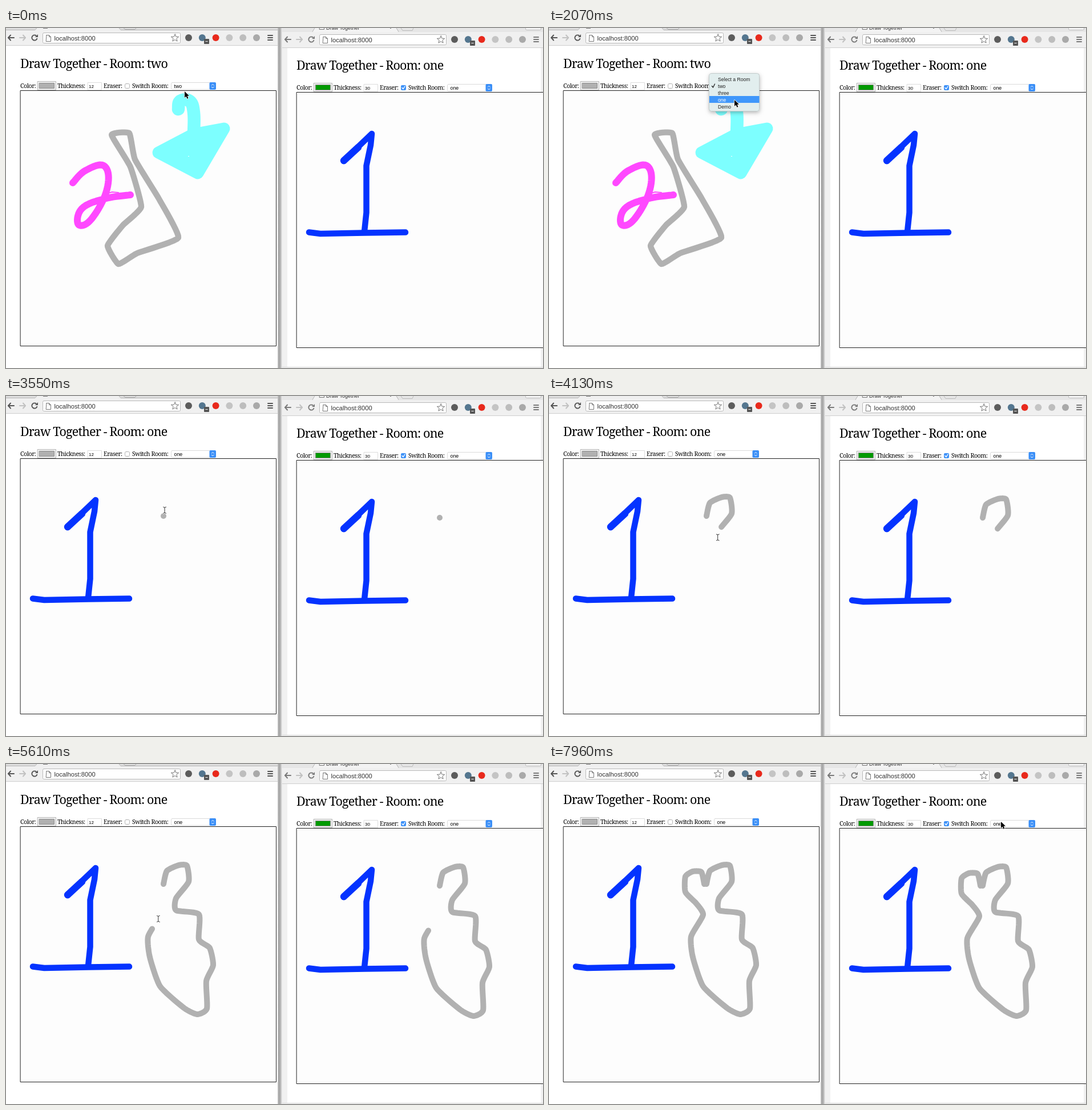
An HTML page with a canvas for the animation above (8 s loop, 941 px wide and 595 px high).

```html
<!DOCTYPE html>
<html lang="en">
<head>
<meta charset="utf-8">
<title>Draw Together</title>
<style>
  html, body { margin: 0; width: 100%; height: 100%; overflow: hidden; background: #fff; }
  canvas { display: block; }
</style>
</head>
<body>
<canvas id="stage" width="941" height="595"></canvas>
<script>
const ctx = document.getElementById('stage').getContext('2d');
const LOOP = 8000, STEP = 147.4;
const SERIF = '"Noto Serif", serif', SANS = '"Liberation Sans", sans-serif';
const GRAY = '#b1b1b1', BLUE = '#0433ff', CYAN = '#7dffff', PINK = '#ff48ff';
const ITEMS = ['Select a Room', 'two', 'three', 'one', 'Demo'];

// Steps at which the story moves on
const OPEN = 2, PICK = 17, JOIN = 18, PRESS = 24, RELEASE = 43, LEAVE = 45, END = 54;

const clamp = v => Math.min(1, Math.max(0, v));
const easeOut = p => 1 - (1 - p) ** 2;
const mix = (a, b, p) => a.map((v, i) => v + (b[i] - v) * p);

// Cardinal spline through a few key points, as a dense polyline.
function spline(keys, closed = false, tension = 0.3) {
  const n = keys.length, pts = [];
  const key = i => keys[closed ? (i + n) % n : Math.min(n - 1, Math.max(0, i))];
  for (let i = 0; i < (closed ? n : n - 1); i++) {
    const [a, b, c, d] = [key(i - 1), key(i), key(i + 1), key(i + 2)];
    for (let s = 0; s < 10; s++) {
      const t = s / 10, u = 1 - t;
      pts.push(b.map((v, j) =>
        v * (1 + 2 * t) * u * u + c[j] * t * t * (3 - 2 * t) +
        tension * (t * u * u * (c[j] - a[j]) - t * t * u * (d[j] - v))));
    }
  }
  if (!closed) pts.push(keys[n - 1]);
  return pts;
}

// The first part of a polyline, up to a fraction of its length.
function prefix(pts, part) {
  const gap = i => Math.hypot(pts[i][0] - pts[i - 1][0], pts[i][1] - pts[i - 1][1]);
  let left = part * pts.reduce((sum, _, i) => i ? sum + gap(i) : 0, 0);
  const out = [pts[0]];
  for (let i = 1; i < pts.length && left > 0; i++) {
    const d = gap(i);
    out.push(mix(pts[i - 1], pts[i], Math.min(1, left / d)));
    left -= d;
  }
  return out;
}

const SKETCH = spline([[276,210],[282,187],[303,177],[317,178],[320,206],[298,235],[298,256],
  [338,263],[338,307],[357,322],[363,352],[351,380],[352,428],[335,438],[312,427],[270,389],
  [252,338],[249,302],[270,264],[258,244],[239,224],[239,197],[252,188],[267,189],[272,210]]);
const BOOT = spline([[185,187],[216,184],[226,230],[268,299],[302,367],[230,394],[197,413],
  [178,381],[205,345],[237,313],[218,243]], true, 0.2);
const TWO = spline([[117,271],[140,249],[173,242],[177,282],[150,334],[127,344],[133,316],
  [172,299],[218,292]], false, 0.6);

// Share of the sketch drawn at step k: slow, fast, slow.
function drawn(k) {
  const p = clamp((k - PRESS) / (RELEASE - PRESS));
  return (p + p * p * (3 - 2 * p)) / 2;
}

function pointerAt(k) {
  const glide = (a, b, from, to) => mix(a, b, easeOut(clamp((k - from) / (to - from))));
  if (k < 9) return glide([313, 111], [324, 101], 0, 3);
  if (k < 21) return glide([324, 101], [325, 126], 9, 14);
  if (k < PRESS) return glide([325, 126], SKETCH[0], 21, PRESS);
  if (k < LEAVE) return prefix(SKETCH, drawn(k + 0.5)).pop();
  return glide(SKETCH[SKETCH.length - 1], [792, 101], LEAVE, END);
}

function rect(x, y, w, h, fill, stroke, r = 0) {
  ctx.beginPath();
  ctx.roundRect(x, y, w, h, r);
  if (fill) { ctx.fillStyle = fill; ctx.fill(); }
  if (stroke) { ctx.strokeStyle = stroke; ctx.lineWidth = 1; ctx.stroke(); }
}

function disc(x, y, r, fill) {
  ctx.beginPath();
  ctx.arc(x, y, r, 0, Math.PI * 2);
  ctx.fillStyle = fill;
  ctx.fill();
}

function trace(pts, closed) {
  ctx.beginPath();
  pts.forEach(([x, y]) => ctx.lineTo(x, y));
  if (closed) ctx.closePath();
}

function line(pts, color, width = 1, closed = false) {
  trace(pts, closed);
  ctx.strokeStyle = color;
  ctx.lineWidth = width;
  ctx.lineCap = ctx.lineJoin = 'round';
  ctx.stroke();
}

function area(pts, color) {
  trace(pts, true);
  ctx.fillStyle = color;
  ctx.fill();
}

function chevron(x, y, dx, dy, color, width = 1) {
  line([[x - dx, y + dy], [x, y], [x + dx, y + dy]], color, width);
}

function text(s, x, y, size, family, color = '#000', spacing = 0) {
  ctx.font = size + 'px ' + family;
  ctx.letterSpacing = spacing + 'px';
  ctx.fillStyle = color;
  ctx.fillText(s, x, y);
}

function at(x, y, draw) {
  ctx.save();
  ctx.translate(x, y);
  draw();
  ctx.restore();
}

function fileIcon(x, y) {
  line([[x, y], [x + 5, y], [x + 8, y + 3], [x + 8, y + 11], [x, y + 11]], '#777', 1, true);
  line([[x + 5, y], [x + 5, y + 3], [x + 8, y + 3]], '#777');
}

function star(cx, cy) {
  const pts = Array.from({ length: 10 }, (_, i) => {
    const a = -Math.PI / 2 + i * Math.PI / 5, r = i % 2 ? 3 : 7;
    return [cx + r * Math.cos(a), cy + r * Math.sin(a)];
  });
  line(pts, '#777', 1, true);
}

function arrowIcon(cx, dir, color) {
  line([[cx - 5, 17], [cx + 5, 17]], color, 2);
  line([[cx + dir, 12.5], [cx + dir * 5, 17], [cx + dir, 21.5]], color, 2);
}

// `far` is the x of the address field's right edge.
function toolbar(far, ink) {
  arrowIcon(9, -1, ink);
  arrowIcon(29, 1, '#c2c2c2');
  ctx.beginPath();
  ctx.arc(50, 17, 4.6, 0.4, 5.3);
  ctx.strokeStyle = ink;
  ctx.lineWidth = 2;
  ctx.stroke();
  area([[51, 16], [56, 16], [56, 11]], ink);
  rect(64.5, 8.5, far - 65, 18, '#fff', '#b9b9b9', 2);
  fileIcon(70.5, 12.5);
  text('localhost:8000', 84.5, 21.5, 11.2, SANS, '#333');
  star(far - 10, 17.5);

  // Extension buttons as plain spots
  ['#5c5c5c', '#54768f', '#e8291c', '#c4c4c4', '#bdbdbd', '#a9a9a9']
    .forEach((color, i) => disc(far + 14 + i * 23.8, 17, 6, color));
  rect(far + 41, 19, 9, 9, '#555', null, 1);
  rect(far + 43.5, 23, 4, 1, '#fff');
  for (const y of [13, 17, 21]) line([[far + 153, y], [far + 161, y]], ink, 2);
}

function controls(room, swatch, size, erasing, focused) {
  text('Draw Together - Room: ' + room, 25, 69.5, 21.5, SERIF, '#000', -0.85);
  const label = (s, x) => text(s, x, 105, 10.6, SERIF, '#000', -0.45);
  label('Color:', 25);
  label('Thickness:', 90);
  label('Eraser:', 171);
  label('Switch Room:', 221);

  rect(55.5, 93.5, 32, 15, '#f1f1f1', '#b5b5b5');
  rect(58.5, 96.5, 26, 9, swatch, '#8c8c8c');
  rect(143.5, 95.5, 24, 13, '#fff', '#dcdcdc');
  text(size, 145, 105, 8, SANS);

  if (erasing) {
    rect(208, 97, 9, 9, '#3f92f8', null, 2);
    line([[210, 101.5], [212, 103.7], [215, 99]], '#fff', 1.3);
  } else {
    rect(208.5, 97.5, 8, 8, '#fff', '#b0b0b0', 2);
  }

  if (focused) rect(288, 94, 82, 15, '#84bdf3', null, 3);
  rect(289.5, 95.5, 78, 12, '#fff', focused ? '#84bdf3' : '#dadada', 2);
  rect(356.5, 95, 11.5, 13, '#3b8ff7', null, 2);
  chevron(362.3, 98.3, 2, 2, '#fff');
  chevron(362.3, 105, 2, -2, '#fff');
  text(room, 294.5, 105, 8.8, SANS);
}

function numeralOne() {
  line([[108,230],[133,205],[157,182],[155,202],[147.5,238],[147.5,320],[144,353]], BLUE, 10.5);
  line([[108,229],[133,206]], BLUE, 12.5);
  line([[47,354.5],[67,357],[144,355.5],[216,354.5]], BLUE, 10.5);
}

function roomTwo() {
  const head = [[267,218],[328,186],[382,176],[336,254]];
  line(spline([[302,142],[305,128],[322,128],[329,148],[329,186]], false, 0.6), CYAN, 22.5);
  area(head, CYAN);
  line(head, CYAN, 21, true);
  rect(319, 224, 2, 1, '#fff');
  line(BOOT, GRAY, 10.3, true);
  line(TWO, PINK, 12);
  line([[176, 290], [186, 287], [197, 288]], PINK, 2);
}

function sketch(k) {
  if (k >= PRESS) line(prefix(SKETCH, drawn(k)), GRAY, 10);
}

function menu(active) {
  ctx.save();
  ctx.shadowColor = 'rgba(0,0,0,.3)';
  ctx.shadowBlur = 7;
  ctx.shadowOffsetY = 2;
  rect(281, 80, 88, 66, '#e2eeee', null, 4);
  ctx.restore();
  rect(280.5, 79.5, 88, 66, null, '#c3cccc', 4);
  if (active >= 0) rect(281, 83 + active * 12, 87.5, 12, '#3f97fb');
  const ink = i => i === active ? '#fff' : '#222';
  ITEMS.forEach((s, i) => text(s, 296, 92.5 + i * 12, 8.6, SANS, ink(i)));
  line([[285.5, 101.5], [287.5, 104], [290.5, 98]], ink(1), 1.3);
}

function pointer(x, y, beam) {
  at(x, y, () => {
    if (beam) {
      for (const [color, width] of [['#fff', 2.5], ['#333', 1]]) {
        chevron(0, -4.5, 2.5, -1, color, width);
        chevron(0, 4.5, 2.5, 1, color, width);
        line([[0, -4.5], [0, 4.5]], color, width);
      }
      return;
    }
    const shape = [[0,0],[0,11],[2.6,8.6],[4.4,12.8],[6.4,12],[4.6,7.8],[8,7.8]];
    line(shape, '#fff', 1.6, true);
    area(shape, '#000');
  });
}

function rightWindow(k) {
  rect(481, 0, 460, 595, '#f1f1f1');
  rect(493, 34, 444, 559, '#fff');
  rect(481, 0, 460, 7, '#e6e6e6');
  area([[537, 7], [541, 0], [684, 0], [688, 7]], '#f3f3f3');
  line([[537, 6.5], [541, 0]], '#b5b5b5');
  line([[684, 0], [688, 6.5]], '#b5b5b5');
  line([[692, 0], [695, 4.5], [712, 4.5], [714, 0]], '#bbb');
  rect(910.5, -4.5, 27, 8, '#f4f4f4', '#bbb', 2);
  fileIcon(549.5, -8.5);
  text('Draw Together', 561, 2.5, 9, SANS, '#333');
  chevron(674, 1, 2, -2, '#777');
  rect(481, 7, 460, 27, '#f0f0f0');
  rect(481, 34, 460, 1, '#cfcfcf');
  rect(481, 593, 460, 1, '#d9d9d9');
  at(485, 3, () => toolbar(287, '#7a7a7a'));
  at(484, 3, () => {
    controls('one', '#009a00', '30', true, false);
    rect(25.5, 109.5, 480, 447, '#fdfdfd', '#222');
    numeralOne();
    sketch(k);
  });
}

function leftWindow(k) {
  const joined = k >= JOIN;
  rect(0, 0, 477, 595, '#fff');
  rect(0, 0, 477, 31, '#f0f0f0');
  rect(0, 0, 477, 3, '#dedede');
  area([[51, 3.5], [54, 0], [198, 0], [201, 3.5]], '#f0f0f0');
  line([[0, 3.5], [51, 3.5], [54, 0]], '#b5b5b5');
  line([[198, 0], [201, 3.5], [477, 3.5]], '#b5b5b5');
  line([[206, 0], [209, 2.5], [226, 2.5], [228, 0]], '#aaa');
  rect(65, 0, 8, 1, '#777');
  rect(0, 30, 477, 1, '#cfcfcf');

  const edge = ctx.createLinearGradient(476, 0, 484, 0);
  ['#c9c9c9', '#a2a2a2', '#b9b9b9', '#f1f1f1'].forEach((c, i) => edge.addColorStop(i / 3, c));
  rect(476, 0, 8, 595, edge);

  toolbar(306, '#555');
  controls(joined ? 'one' : 'two', GRAY, '12', false, joined && k < PRESS);
  rect(25.5, 109.5, 448, 447, '#fdfdfd', '#222');
  if (!joined) roomTwo();
  else if (k === JOIN + 1) line([[109, 232], [112.5, 228.5]], BLUE, 2.2);
  else if (k > JOIN) numeralOne();
  sketch(k);
}

function render(t) {
  const k = Math.floor((t + 8) / STEP);
  const [x, y] = pointerAt(k);
  rightWindow(k);
  leftWindow(k);
  if (k >= OPEN && k < JOIN) menu(k === PICK ? -1 : Math.floor((y - 83) / 12));
  pointer(x, y, k >= PRESS && k <= LEAVE);
}

const start = performance.now();
function tick(now) {
  render(Math.max(0, now - start) % LOOP);
  requestAnimationFrame(tick);
}
requestAnimationFrame(tick);
</script>
</body>
</html>
```
